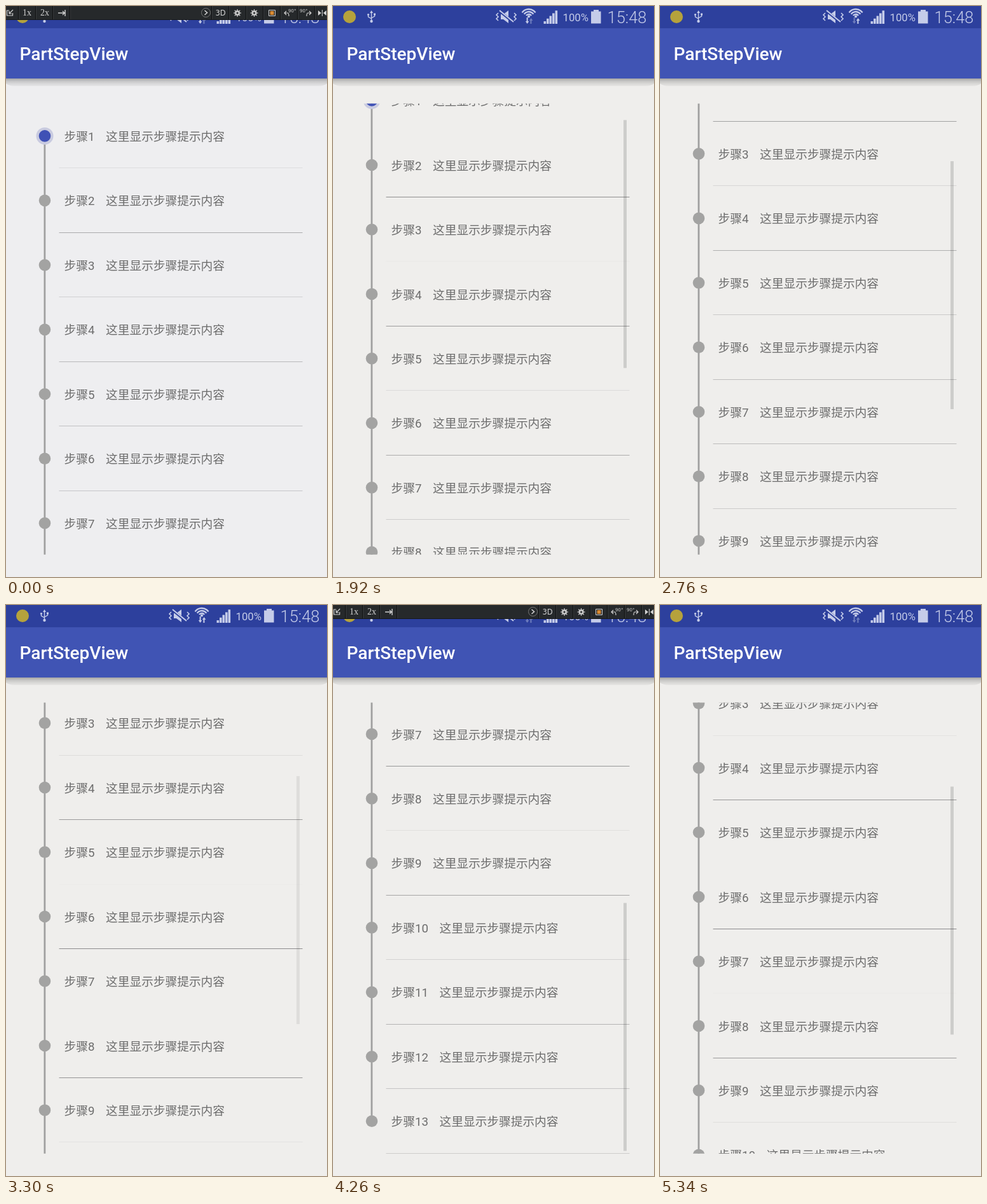
Recreate the animation shown at these times as an HTML page with a canvas. Size 505x898 px, loop 5400 ms.

```html
<!DOCTYPE html>
<html lang="zh-CN">
<head>
<meta charset="utf-8">
<title>PartStepView</title>
<style>
  html, body { margin: 0; width: 100%; height: 100%; overflow: hidden; background: #efeeec; }
  canvas { display: block; width: 505px; height: 898px; }
</style>
</head>
<body>
<canvas id="stage" width="505" height="898"></canvas>
<script>
const ctx = document.getElementById('stage').getContext('2d');
const LOOP = 5400, STEP = 60;
const SCALE = 505 / 1080;            // device pixels to stage pixels
const ROW = 217, FIRST_DIVIDER = 544.6;
const ROWS = 13;
const VIEW = { top: 153.5, bottom: 862.7 };
const SANS = "Roboto, 'Noto Sans CJK SC', 'Noto Sans CJK', sans-serif";
const ICON = '#c5cce9';

// [time, scroll offset in device pixels]
const SCROLL = [[0, 0], [1440, 0], [1920, 119.5], [2460, 274.2], [3060, 474.15], [3420, 474.15],
  [3720, 770], [3960, 1120], [4140, 1260], [4260, 1305.1], [4860, 1305.1], [5100, 965], [5340, 540.5], [5400, 500]];
// [time, visible part of the tool strip]
const STRIP = [[0, 1], [60, 1], [180, 0], [3540, 0], [3660, 1], [4860, 1], [4980, 0], [5400, 0]];
// [time, opacity of the scroll thumb]
const THUMB = [[0, 0], [1440, 0], [1500, 1], [3180, 1], [3420, 0], [3480, 1], [4440, 1], [4680, 0], [4860, 0], [4920, 1], [5400, 1]];

function at(keys, t) {
  const i = Math.max(1, keys.findIndex(k => k[0] >= t));
  const [t0, a] = keys[i - 1], [t1, b] = keys[i];
  return a + (b - a) * (t - t0) / (t1 - t0);
}

function rect(x, y, w, h, color) {
  ctx.fillStyle = color;
  ctx.fillRect(x, y, w, h);
}

function disc(x, y, r, color) {
  ctx.fillStyle = color;
  ctx.beginPath();
  ctx.arc(x, y, r, 0, 7);
  ctx.fill();
}

function shape(path, color, width) {
  const p = new Path2D(path);
  if (width) {
    ctx.strokeStyle = color;
    ctx.lineWidth = width;
    ctx.stroke(p);
  } else {
    ctx.fillStyle = color;
    ctx.fill(p);
  }
}

function text(str, x, y, font, color) {
  ctx.font = font;
  ctx.fillStyle = color;
  ctx.fillText(str, x, y);
  return ctx.measureText(str).width;
}

// A one-device-pixel line, dimmed by how far it lies from the sampled stage rows.
function divider(deviceY) {
  const base = Math.floor(deviceY * SCALE);
  for (let y = base - 1; y <= base + 1; y++) {
    const weight = 1 - Math.abs((y + .5) / SCALE - .5 - deviceY);
    if (weight > 0) rect(83.5, y, 383, 1, `rgba(95,95,97,${weight * .7})`);
  }
}

function drawList(t) {
  const offset = at(SCROLL, t), scroll = offset * SCALE;
  const dotY = n => 204.4 + n * ROW * SCALE - scroll;

  ctx.save();
  ctx.beginPath();
  ctx.rect(0, VIEW.top, 505, VIEW.bottom - VIEW.top);
  ctx.clip();

  if (t >= 1380 && t < 1500) {
    ctx.save();
    ctx.beginPath();
    ctx.rect(0, 458, 505, 101);
    ctx.clip();
    disc(113, 503, 46, t < 1440 ? '#dfdde1' : '#e7e5e7');
    ctx.restore();
  }

  rect(59.5, dotY(0), 2.8, dotY(ROWS - 1) - dotY(0), '#a0a0a0');
  for (let n = 0; n < ROWS; n++) {
    const y = dotY(n);
    if (y < 90 || y > 920) continue;
    if (n === 0) {
      disc(61, y, 13.5, '#c9cbe0');
      disc(61, y, 9.3, '#3f51b5');
    } else {
      disc(61, y, 9.3, '#a3a3a2');
    }
    const font = `18.7px ${SANS}`, color = '#6d6d6d';
    const width = text('步骤' + (n + 1), 91.6, y + 7.6, font, color);
    text('这里显示步骤提示内容', 91.6 + width + 17.6, y + 7.6, font, color);
    divider(FIRST_DIVIDER + n * ROW - offset);
  }

  const thumbTop = 148.5 + .555 * scroll - .00005 * scroll * scroll;
  rect(457, thumbTop, 5, 390, `rgba(0,0,0,${.14 * at(THUMB, t)})`);
  ctx.restore();
}

function drawStatusBar(t) {
  rect(0, 0, 505, 35, '#2d409d');
  disc(26, 17, 10, '#b5a23c');

  // USB
  shape('M60.5 9V23M55.5 14V17L60.5 20M65.5 13V16L60.5 19', ICON, 1.4);
  shape('M60.5 7L63 11H58Z', ICON);
  disc(60.5, 24, 2.2, ICON);
  disc(55.5, 13.5, 1.6, ICON);
  rect(64, 11.5, 3, 3, ICON);

  // Muted, vibrating
  shape('M264 13H268L276 7V27L268 21H264Z', ICON);
  shape('M262 8L284 26', '#2d409d', 4);
  shape('M262 7L284 25', ICON, 2);
  shape('M260 11L257 14L260 17L257 20L260 23M285 11L288 14L285 17L288 20L285 23', ICON, 1.6);

  // Wireless with traffic arrows
  for (const r of [5, 9, 13]) {
    ctx.strokeStyle = ICON;
    ctx.lineWidth = 2.3;
    ctx.beginPath();
    ctx.arc(308, 18, r, -Math.PI * .8, -Math.PI * .2);
    ctx.stroke();
  }
  disc(308, 16.5, 2, ICON);
  const up = t >= 2200 && t < 3800, down = t < 2200 || (t >= 2900 && t < 3800);
  const dim = '#6e7dbd';
  shape('M304.6 18H306.6V24H308.4L305.6 28L302.8 24H304.6Z', down ? ICON : dim);
  shape('M310.4 28V23H308.8L311.6 19L314.4 23H312.4V28Z', up ? ICON : dim);

  for (let i = 0; i < 5; i++) {
    const h = 4 + i * 4.2;
    rect(331.5 + i * 4.5, 28 - h, 3.6, h, ICON);
  }
  text('100%', 361.5, 24, `16.7px ${SANS}`, ICON);
  rect(410, 6, 8, 3, ICON);
  rect(406, 8.5, 15.5, 19, ICON);
  text('15:48', 431.5, 27, `300 25.5px ${SANS}`, ICON);
}

function drawAppBar() {
  const shadow = ctx.createLinearGradient(0, 114, 0, 126);
  shadow.addColorStop(0, 'rgba(0,0,0,.3)');
  shadow.addColorStop(.35, 'rgba(0,0,0,.17)');
  shadow.addColorStop(.7, 'rgba(0,0,0,.09)');
  shadow.addColorStop(1, 'rgba(0,0,0,.04)');
  shape('M0 114H505V122Q500 126 490 126H15Q5 126 0 122Z', shadow);
  rect(0, 35, 505, 79, '#4054b4');
  text('PartStepView', 21.5, 85, `500 28px ${SANS}`, '#fff');
}

function gear(x) {
  for (let i = 0; i < 8; i++) {
    const a = i * Math.PI / 4, c = Math.cos(a), s = Math.sin(a);
    shape(`M${x} 11L${x + 6 * c} ${11 + 6 * s}`, '#c8c8c8', 1.3);
  }
  disc(x, 11, 4, '#c8c8c8');
  disc(x, 11, 1.5, '#26292b');
}

function drawStrip(visible) {
  if (!visible) return;
  const ink = '#d2d2d2';
  ctx.save();
  ctx.translate(0, -22 * (1 - visible));
  rect(0, 0, 505, 22, '#26292b');
  rect(0, 21, 505, 1, '#17191a');
  for (const x of [19, 46, 73, 100, 323, 350, 377, 404, 431, 458, 485]) {
    rect(x, 0, 1, 21, '#0f1011');
    rect(x + 1, 0, 1, 21, '#383b3d');
  }
  shape('M5 7H1.5V15H10.5V11M11 6L5 12M5 8V12H9', ink, 1.2);
  const serif = "14px 'Liberation Serif', serif";
  text('1x', 26, 15, serif, ink);
  text('2x', 54, 15, serif, ink);
  shape('M82 11H92M89 8L92 11L89 14M93 6V16', ink, 1.4);

  ctx.strokeStyle = '#777';
  ctx.lineWidth = 1;
  ctx.beginPath();
  ctx.arc(314.5, 10.5, 7, 0, 7);
  ctx.stroke();
  shape('M312.5 7L316.5 10.5L312.5 14', ink, 1.6);
  text('3D', 329.5, 15, "11.5px 'DejaVu Sans', sans-serif", ink);
  gear(364);
  gear(390.5);
  shape('M413.5 6.5H423.5V15.5H413.5Z', ink, 1);
  rect(415.5, 8, 6, 6, '#d88a32');
  const small = "7px 'DejaVu Sans', sans-serif";
  shape('M441 8L438 11L441 14M438 11H443Q445 11 445 16', ink, 1.2);
  text('90°', 444, 10, small, ink);
  text('90°', 462, 10, small, ink);
  shape('M477 8L480 11L477 14M480 11H475Q473 11 473 16', ink, 1.2);
  shape('M491 7V15L496 11ZM504 7V15L499 11Z', ink);
  rect(497, 6, 1, 10, ink);
  ctx.restore();
}

function frame(now) {
  const t = Math.floor(now % LOOP / STEP) * STEP;
  rect(0, 0, 505, 898, t < 1440 ? '#eeeef0' : '#efeeec');
  drawList(t);
  drawAppBar();
  drawStatusBar(t);
  drawStrip(at(STRIP, t));
}

const start = performance.now();
(function tick() {
  frame(performance.now() - start);
  requestAnimationFrame(tick);
})();
</script>
</body>
</html>
```
